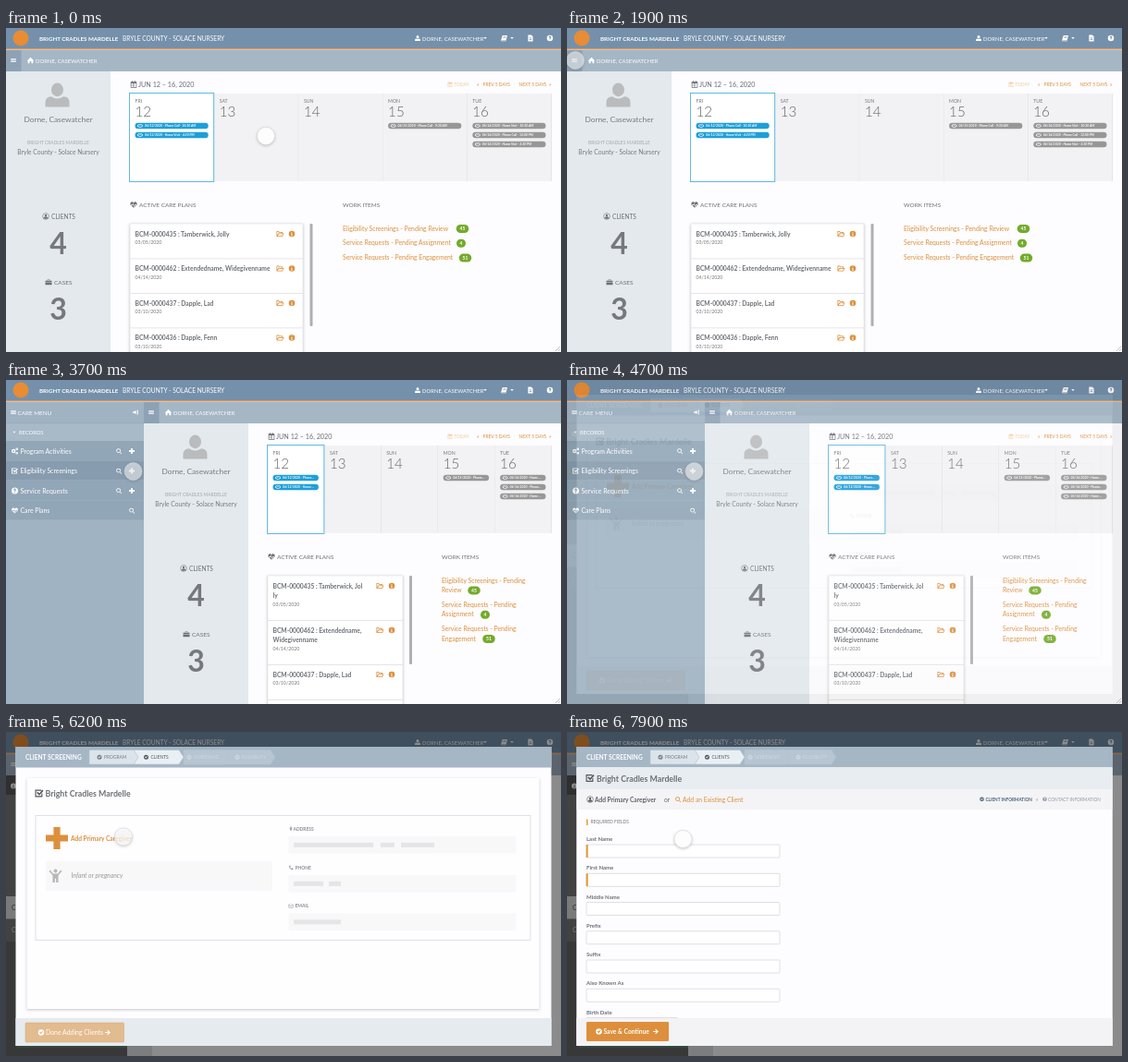
These frames come from a looping animation (600x351 px, 8000 ms). An HTML page:

```html
<!DOCTYPE html>
<html lang="en">
<head>
<meta charset="utf-8">
<title>Care menu walkthrough</title>
<style>
html, body { margin: 0; width: 100%; height: 100%; overflow: hidden; background: #fdfcfe; }
svg { display: block; width: 600px; height: 351px; font-family: Lato, "Open Sans", sans-serif; }
text { white-space: pre; }
.b { font-weight: 700; }
.l { font-weight: 300; }
.i { font-style: italic; }
.m { text-anchor: middle; }
.shadow { filter: drop-shadow(0 1px 1.5px rgba(0,0,0,.22)); }
</style>
</head>
<body>
<svg viewBox="0 0 600 351">
  <g id="page"></g>
  <g id="modal"></g>
  <g id="form"></g>
  <circle id="cursor" class="shadow" r="9.5" fill="#fff" stroke="#d6d6da" stroke-width=".6"/>
</svg>
<script>
const ORG = 'Bright Cradles Mardelle', SITE = 'Bryle County - Solace Nursery', USER = 'Dorne, Casewatcher';
const ORANGE = '#dd8f3c', BLUE = '#1d9fd9', GREY = '#6c7076', BAR = '#a5b6c5', NAV = '#7590aa';

const ring = (r, x = 0, y = 0) => `M${x - r} ${y}a${r} ${r} 0 1 0 ${2 * r} 0a${r} ${r} 0 1 0 ${-2 * r} 0z`;
// Icons on a 16 unit grid centred on the origin
const ICONS = {
  user: 'M0-8a4 4.5 0 0 1 0 9a4 4.5 0 0 1 0-9zM-8 8V5Q-8 1-4 1Q0 4 4 1Q8 1 8 5V8z',
  gears: ring(5, -3) + ring(2, -3) + ring(3, 5, -5) + ring(1, 5, -5) + ring(3, 5, 5) + ring(1, 5, 5),
  person: ring(8) + ring(6.7) + 'M0-5a2.5 3 0 0 1 0 6a2.5 3 0 0 1 0-6zM-5 4Q-4 1-2 1Q0 2.5 2 1Q4 1 5 4Q0 8-5 4z',
  bars: 'M-7-5H7V-3H-7zM-7-1H7V1H-7zM-7 3H7V5H-7z',
  help: ring(8) + 'M-3.5-2Q-3-5.5 0-5.5T3.5-2Q3 0 1 1V2.5H-1V0L1-2Q0-4-1-2zM-1 3.5H1V5.5H-1z',
  info: ring(8) + 'M-2-1H1V4H2V5.5H-2V4H-1V.5H-2zM-1-5H1V-3H-1z',
  home: 'M0-7L8 1H6V7H2V2H-2V7H-6V1H-8z',
  book: 'M-4-7H8L5 5H-6V6H6L5 7.5H-7Q-8 4-7 3zM-2-4V-3H5V-4zM-3-1V0H4V-1z',
  file: 'M-6-8H2L6-4V8H-6zM-3-1V.5H3V-1zM-3 3V4.5H3V3z',
  calendar: 'M-7-6H7V8H-7zM-5.5-2V6.5H5.5V-2zM-4-8H-2V-6H-4zM2-8H4V-6H2zM-2-2H-1V6H-2zM1-2H2V6H1zM-5.5 1.5H-2V2.5H-5.5z',
  heart: 'M0 7L-7 0Q-9-6-4-7Q-1-7 0-4Q1-7 4-7Q9-6 7 0zM-8-.5H-3L-1-3L1 3L2-.5H8V1H3L1 5.5L-1 0L-2.5 1H-8z',
  briefcase: 'M-8-4H-3V-7H3V-4H8V6H-8zM-2-4H2V-6H-2zM-8 0V1H8V0z',
  folder: 'M-8-6H-3L-2-4H5V-1H8L5 6H-8zM-6.5-4.5V2L-4-1H3.5V-2.5H-3L-4-4.5zM-3 .5L-6 4.5H4L6 .5z',
  search: 'M-7-1a6 6 0 1 0 12 0a6 6 0 1 0-12 0zM-5-1a4 4 0 1 0 8 0a4 4 0 1 0-8 0zM3 4.5L4.5 3L8 6.5L6.5 8z',
  plus: 'M-2.4-8H2.4V-2.4H8V2.4H2.4V8H-2.4V2.4H-8V-2.4H-2.4z',
  check: 'M-8-7H4V-5H-6V5H4V1L6-1V7H-8zM-5-1L-3-3L0 0L6-7L8-5L0 4z',
  done: ring(8) + 'M-5 0L-3-2L-1 0L3-4L5-2L-1 4z',
  exit: 'M8-6V6H3V4H6V-4H3V-6zM-8-2H-2V-6L4 0L-2 6V2H-8z',
  arrow: 'M-8-1.5H2L-2-5.5L0-7.5L8 0L0 7.5L-2 5.5L2 1.5H-8z',
  caret: 'M-7-4H7L0 4z',
  child: 'M0-8.5a2.3 2.3 0 1 0 .1 0zM-8-6L-6.5-7.5L-3-3H3L6.5-7.5L8-6L3.5-1V8H.7V3H-.7V8H-3.5V-1z',
  pin: 'M0 8L-4-1Q-5-8 0-8T4-1zM0-6a2 2 0 1 0 .1 0z',
  phone: 'M-6-7L-3-8L-1-4L-3-2Q-1 2 2 3L4 1L8 3L7 6Q4 9-2 4T-6-7z',
  mail: 'M-8-6H8V6H-8zM-6.5-4.5L0 1L6.5-4.5zM-6.5-2.5V4.5H6.5V-2.5L0 3z',
  hands: 'M-8-3L-3-5L0-4L3-5L8-3V2L2 5H-2L-8 2zM-6-2V1L-1 3.5H1L6 1V-2L3-3L0-1L-3-3z'
};

const text = (s, x, y, size, fill, cls = '') =>
  `<text x="${x}" y="${y}" font-size="${size}" fill="${fill}" class="${cls}">${s}</text>`;
const rect = (x, y, w, h, fill, extra = '') =>
  `<rect x="${x}" y="${y}" width="${w}" height="${h}" fill="${fill}" ${extra}/>`;
const path = (d, fill, extra = '') => `<path d="${d}" fill="${fill}" ${extra}/>`;
const icon = (name, x, y, size, fill) =>
  path(ICONS[name], fill, `fill-rule="evenodd" transform="translate(${x} ${y}) scale(${size / 16})"`);
const lerp = (a, b, p) => a + (b - a) * p;
const ease = (t, from, to) => {
  const u = Math.min(1, Math.max(0, (t - from) / (to - from)));
  return u * u * (3 - 2 * u);
};

const DAYS = [
  ['FRI', 12, ['06/12/2020 - Phone Call - 10:30 AM', '06/12/2020 - Home Visit - 4:30 PM']],
  ['SAT', 13, []], ['SUN', 14, []],
  ['MON', 15, ['06/15/2020 - Phone Call - 9:30 AM']],
  ['TUE', 16, ['06/16/2020 - Home Visit - 10:30 AM', '06/16/2020 - Phone Call - 12:00 PM', '06/16/2020 - Home Visit - 3:30 PM']]
];
// "|" marks where a line breaks in the narrow layout
const PLANS = [
  ['BCM-0000435 : Tamberwick, Jol|ly', '03/05/2020'],
  ['BCM-0000462 : Extendedname, |Widegivenname', '04/14/2020'],
  ['BCM-0000437 : Dapple, Lad', '03/10/2020'],
  ['BCM-0000436 : Dapple, Fenn', '03/10/2020']
];
const WORK = [
  ['Eligibility Screenings - Pending |Review', 45, 493.5, 506],
  ['Service Requests - Pending |Assignment', 4, 492, 518],
  ['Service Requests - Pending |Engagement', 51, 496.5, 522]
];
const MENU = [['gears', 'Program Activities'], ['check', 'Eligibility Screenings'], ['help', 'Service Requests'], ['heart', 'Care Plans']];

function navBar() {
  return rect(0, 0, 600, 22, NAV) + rect(0, 22, 600, 1.6, '#cf9a6b') +
    `<circle cx="16" cy="11" r="8.5" fill="#e88c35"/>` +
    text(ORG.toUpperCase(), 36, 13.6, 6.2, '#fff', 'b') + text(SITE.toUpperCase(), 126, 13.6, 6.6, '#fff') +
    icon('user', 445, 11, 6, '#fff') + text(USER.toUpperCase(), 450, 13.6, 5.9, '#fff') + icon('caret', 518, 11, 4, '#fff') +
    icon('book', 538.5, 11, 7, '#fff') + icon('caret', 547, 11, 4, '#fff') +
    icon('file', 567, 11, 7, '#fff') + icon('help', 588, 11, 6.5, '#fff');
}

function calendar(x, p) {
  const w = (590 - x) / 5;
  const cols = DAYS.map(([name, num, items], i) => {
    const left = x + i * w;
    const pills = items.map((label, k) => {
      const y = 106 + 10 * k;
      return rect(left + 5.5, y - 3.3, w - 12, 6.6, i ? '#979797' : BLUE, 'rx="3.3"') +
        icon('hands', left + 11, y, 5.5, '#fff') +
        text(p > .5 ? label.slice(0, 18) + '…' : label, left + 16, y + 1.3, 3.5, '#fff', 'b i');
    }).join('');
    return rect(left, 71, w, 95, i ? '#f2f1f3' : '#fff') + rect(left + w - .6, 71, .6, 95, '#dedde0') +
      text(name, left + 5.5, 80.5, 5.2, '#777') + text(num, left + 5.5, 95.6, 15.2, '#666', 'l') + pills;
  }).join('');
  return cols + rect(x - .5, 70.5, w, 96, 'none', 'stroke="#4fb3de" stroke-width=".9"');
}

function carePlans(x, p) {
  const narrow = p > .5, right = lerp(321, 429, p);
  const tops = narrow ? [212, 260, 308, 346] : [212, 249.5, 287, 324.5];
  return rect(x, 212, right - x, 150, '#fff', 'stroke="#e2e2e5" stroke-width=".7" class="shadow"') +
    PLANS.map(([label, date], i) => {
      const lines = narrow ? label.split('|') : [label.replace('|', '')], y = tops[i];
      return (i ? rect(x, y, right - x, .8, '#dfdfe2') : '') +
        lines.map((s, k) => text(s, x + 5.5, y + 13.5 + 10.5 * k, 6.7, GREY, 'b')).join('') +
        text(date, x + 5.5, y + 11.5 + 10.5 * lines.length, 5.2, '#777') +
        icon('folder', right - 24.5, y + 11, 8, ORANGE) + icon('info', right - 12, y + 11, 6.6, ORANGE);
    }).join('') +
    rect(lerp(328.5, 436, p), 212, 3, lerp(111, 96, p), '#b0afb2', 'rx="1"');
}

function workItems(p) {
  const x = lerp(364, 471, p), narrow = p > .5;
  return text('WORK ITEMS', x, 194, 6.4, GREY) + WORK.map(([label, count, wideX, narrowX], i) => {
    const y = narrow ? 219.5 + 26.3 * i : 219.5 + 15.8 * i;
    const lines = narrow ? label.split('|') : [label.replace('|', '')];
    const bx = narrow ? narrowX : wideX, by = narrow ? y + 8.4 : y - 2, w = count > 9 ? 13.5 : 10;
    return lines.map((s, k) => text(s, x, y + 10.5 * k, 6.8, ORANGE)).join('') +
      rect(bx - w / 2, by - 4.5, w, 9, '#74aa2a', 'rx="4.5"') + text(count, bx, by + 1.8, 5, '#fff', 'b m');
  }).join('');
}

function careMenu(shift, hover) {
  return `<g transform="translate(${shift - 149} 0)">` +
    rect(0, 24, 149, 327, '#a0b3c3') + rect(0, 47, 149, 19, '#a8b9c7') + rect(0, 46.5, 149, .7, '#94a8b9') +
    icon('bars', 8, 35, 6.5, '#fff') + text('CARE MENU', 12.5, 37.5, 6.3, '#fff') + icon('exit', 140, 35, 6, '#fff') +
    icon('caret', 9, 56.5, 3.5, '#fff') + text('RECORDS', 14, 58.5, 5.8, '#fff') +
    MENU.map(([name, label], i) => {
      const y = 66 + 21.5 * i;
      return rect(0, y, 149, 21.5, i == hover ? '#879cae' : '#91a6b7') + rect(0, y + 21, 149, .6, '#a3b5c4') +
        icon(name, 9.5, y + 11, 7, '#fff') + text(label, 15.5, y + 13.5, 6.9, '#fff') +
        icon('search', i < 3 ? 122 : 136, y + 11, 6.5, '#fff') + (i < 3 ? icon('plus', 136, y + 11, 6, '#fff') : '');
    }).join('') + '</g>';
}

function pageView(p, hover) {
  const s = 149 * p, x = 134 + s, mid = 56.5 + s;
  return rect(0, 0, 600, 351, '#fdfcfe') + rect(s, 24, 600, 23, BAR) + rect(s, 24, 16.5, 23, '#8da2b5') +
    icon('bars', s + 8, 35, 6.5, '#fff') + icon('home', s + 26.5, 35, 7.5, '#fff') +
    text(USER.toUpperCase(), s + 32, 37.5, 5.9, '#fff') +
    rect(s, 47, 113, 304, '#e3e9ed') +
    icon('user', mid - 1, 72.5, 26, '#b9bbbd') + text(USER, mid, 102, 8.3, '#757b81', 'm') +
    text(ORG.toUpperCase(), mid, 125.5, 4.9, '#a2a8ae', 'm') + text(SITE, mid, 136.7, 6.7, '#757b81', 'm') +
    icon('person', s + 43, 204, 7, GREY) + text('CLIENTS', s + 49, 206.5, 6.6, GREY) + text(4, mid, 245, 32, '#75787c', 'b m') +
    icon('briefcase', s + 46, 275.5, 7, GREY) + text('CASES', s + 52, 278, 6.5, GREY) + text(3, mid, 316.3, 32, '#75787c', 'b m') +
    icon('calendar', x + 4, 61, 7.5, GREY) + text('JUN 12 – 16, 2020', x + 9, 64, 7.2, GREY) +
    icon('calendar', 480, 61, 5.5, '#f1cda0') + text('TODAY', 484, 63.3, 5, '#f1cda0') +
    text('«', 509, 63, 6, ORANGE) + text('PREV 5 DAYS', 515.5, 63.3, 4.9, ORANGE) +
    text('NEXT 5 DAYS', 554.5, 63.3, 4.9, ORANGE) + text('»', 587, 63, 6, ORANGE) +
    calendar(x, p) + icon('heart', x + 4, 191.5, 7.5, GREY) + text('ACTIVE CARE PLANS', x + 10, 194, 6.4, GREY) +
    carePlans(x, p) + workItems(p) + path('M594 350L599 345M597 350L599 348', 'none', 'stroke="#aaa" stroke-width=".7"') +
    (p ? careMenu(s, hover) : '') + navBar();
}

function steps() {
  const shape = (a, b, fill) => path(`M${a} 19.5H${b}L${b + 5} 27.2L${b} 35H${a}z`, fill, 'stroke="#afbfcd" stroke-width=".6"');
  return shape(192, 286, '#b7c5d2') + shape(192, 236, '#b7c5d2') + shape(138, 187, '#eaeff3') + shape(90, 138, '#dce4eb') +
    [['PROGRAM', 106, '#777d85'], ['CLIENTS', 156.5, '#4f5963'], ['SCREENING', 203, '#cdd7e0'], ['ELIGIBILITY', 255, '#cdd7e0']]
      .map(([s, x, c]) => icon('done', x - 5, 27.2, 5, c) + text(s, x, 29, 4.9, c)).join('');
}

function modalView() {
  const behind = rect(0, 0, 600, 351, '#fdfcfe') + rect(0, 24, 600, 23, BAR) + icon('bars', 8, 35, 6.5, '#fff') +
    rect(0, 47, 131, 304, '#777') + rect(0, 47, 131, 21, '#555') + icon('info', 8, 58.5, 6, '#fff') +
    rect(0, 178, 131, 24, '#ddd') + text('C', 6, 193, 7, '#555') + text('C', 6, 217, 7, '#ddd') +
    rect(0, 202, 131, .8, '#aaa') + rect(0, 227, 131, 124, '#666') + rect(12, 336, 119, 5.5, '#5f8f78') +
    rect(131, 47, 27, 304, '#dfe3e6') + navBar() + rect(0, 0, 600, 351, '#000', 'opacity=".45"');
  const field = (name, label, y, blocks) => icon(name, 308, y, 5, '#999') + text(label, name == 'pin' ? 310.5 : 312.5, y + 1.9, 4.9, '#8c8c8e', 'b') +
    rect(305.5, y + 8, 246, 18.5, '#f8f8f9') + blocks.map(([a, b]) => rect(a, y + 14.8, b - a, 5, '#e5e5e7')).join('');
  return behind + rect(10.5, 16, 579, 324, '#fdfcfe') + rect(10.5, 16, 579, 22.5, BAR) +
    text('CLIENT SCREENING', 21, 29.6, 6.6, '#fff', 'b') + steps() +
    rect(22.5, 50, 554, 250, '#fefdff', 'class="shadow"') + icon('check', 36, 66.5, 9, '#555') + text(ORG, 42.5, 70, 8.8, GREY, 'b') +
    rect(32, 90.5, 535, 135, 'none', 'stroke="#dedee1" stroke-width=".9"') +
    icon('plus', 55, 115, 24, ORANGE) + text('Add Primary Caregiver', 70, 118, 6.6, ORANGE, 'b') +
    rect(43, 140, 245, 32, '#f8f8f9') + icon('child', 53.5, 156, 14, '#b8b8ba') + text('Infant or pregnancy', 70.5, 158.3, 6.9, '#999', 'i') +
    field('pin', 'ADDRESS', 105, [[311, 397], [405, 420], [427, 463]]) +
    field('phone', 'PHONE', 147, [[311, 343], [349, 362]]) + field('mail', 'EMAIL', 188.5, [[311, 362]]) +
    rect(10.5, 310, 579, 30, '#e6ebf0') + rect(21, 315, 106.5, 21, '#e2bb8e', 'rx="1" stroke="#d9ad78" stroke-width=".6"') +
    icon('done', 38, 325.5, 6.5, '#fff') + text('Done Adding Clients', 43, 327.8, 6.9, '#fff') + icon('arrow', 110, 325.5, 6, '#fff');
}

function formView() {
  const labels = ['Last Name', 'First Name', 'Middle Name', 'Prefix', 'Suffix', 'Also Known As', 'Birth Date'];
  return rect(10.5, 38.5, 579, 301.5, '#fdfcfe') + rect(10.5, 38.5, 579, 23.5, '#e8edf1') +
    icon('check', 25, 50, 9, '#555') + text(ORG, 32, 53.5, 8.8, GREY, 'b') +
    rect(10.5, 62, 579, 22, '#f4f4f6') + icon('person', 25, 73, 7, '#555') +
    text('Add Primary Caregiver', 30, 75.5, 6.6, '#5d6166', 'b') + text('or', 105, 75.5, 6.6, '#666') +
    icon('search', 120, 73, 6.5, ORANGE) + text('Add an Existing Client', 125, 75.5, 6.8, ORANGE) +
    icon('done', 448.5, 72.8, 4.6, '#4b6177') + text('CLIENT INFORMATION', 452.5, 74.8, 4.7, '#4b6177', 'b') +
    text('»', 507, 74.6, 5, '#777') + icon('help', 516.5, 72.8, 4.6, '#8b9aa8') + text('CONTACT INFORMATION', 520, 74.8, 4.8, '#8b9aa8') +
    rect(21, 94.5, 1.5, 6.5, '#df9a35') + text('REQUIRED FIELDS', 25.5, 99.4, 4.9, '#777') +
    labels.map((label, i) => {
      const y = 122 + 31.25 * i;
      return text(label, 21, y - 4, 6, GREY, 'b') +
        rect(21, y, i < 6 ? 209 : 99, 14, '#fff', 'stroke="#d8d8dc" stroke-width=".8" rx="1"') +
        (i < 2 ? rect(20.7, y, 2, 14, '#df9a35') : '');
    }).join('') +
    rect(10.5, 310, 579, 30, '#f3f3f5') + rect(21, 314, 89, 21, ORANGE, 'rx="1"') +
    icon('done', 34.5, 324.5, 6.5, '#fff') + text('Save &amp; Continue', 39.5, 327, 6.7, '#fff', 'b') + icon('arrow', 96, 324.5, 6, '#fff');
}

// Cursor moves: start, end, x, y
const MOVES = [[100, 1100, 9, 35], [2000, 2380, 35.5, 78.5], [2700, 3600, 137.5, 99], [5300, 6000, 127, 113.5], [7000, 7600, 125.5, 116]];
const [page, modal, form, cursor] = ['page', 'modal', 'form', 'cursor'].map(id => document.getElementById(id));
modal.innerHTML = modalView();
form.innerHTML = formView();

let drawn = '';
function frame() {
  const t = performance.now() % 8000;
  let x = 281, y = 117;
  for (const [from, to, nx, ny] of MOVES) {
    const u = ease(t, from, to);
    x = lerp(x, nx, u);
    y = lerp(y, ny, u);
  }
  const open = ease(t, 1980, 2340), hover = Math.floor((y - 66) / 21.5), key = open + '/' + hover;
  if (key != drawn) {
    page.innerHTML = pageView(open, hover);
    drawn = key;
  }
  const modalShown = ease(t, 4640, 4940), formShown = ease(t, 6650, 6950);
  modal.style.opacity = modalShown;
  form.style.opacity = formShown;
  cursor.setAttribute('cx', x);
  cursor.setAttribute('cy', y);
  cursor.setAttribute('fill-opacity', .95 - .4 * ease(t, 900, 1100) + .35 * modalShown - .15 * ease(t, 5300, 6000) + .2 * formShown);
  requestAnimationFrame(frame);
}
frame();
</script>
</body>
</html>
```
